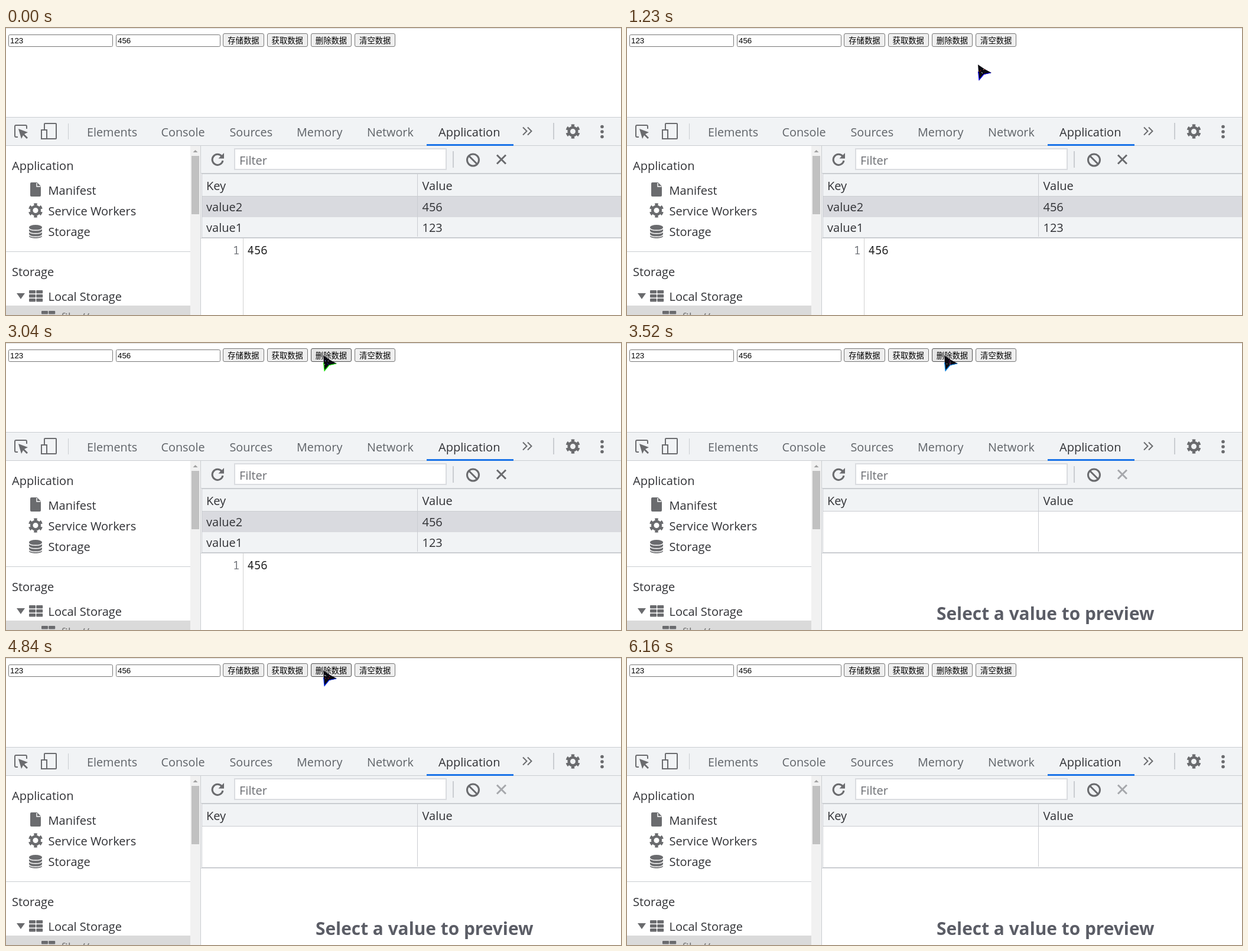
These frames come from a looping animation (1041 by 487 pixels, 6.49 s). An HTML page:

```html
<!DOCTYPE html>
<html lang="zh">
<head>
<meta charset="utf-8">
<title>Local Storage</title>
<style>
html, body { margin: 0; width: 100%; height: 100%; overflow: hidden; background: #fff; }
svg { display: block; width: 1041px; height: 487px; }
text { font: 20px "Open Sans", "Noto Sans", sans-serif; fill: #303135; white-space: pre; }
.tabs text { font-size: 19.8px; fill: #5f6368; }
.page text { font: 13.333px "Liberation Sans", Arial, sans-serif; fill: #000; }
.page .btn text { font-family: "Noto Sans CJK SC", "Noto Sans CJK", sans-serif; }
.page rect { fill: #fff; stroke: #767676; }
.page .btn rect { fill: #efefef; }
.page .btn.hover rect { fill: #e5e5e5; stroke: #4f4f4f; }
.page .btn.active rect { fill: #f5f5f5; stroke: #8d8d8d; }
.code text { font: 500 19px "Noto Sans Mono", "DejaVu Sans Mono", monospace; fill: #222; }
.bar { fill: #f1f3f5; }
.rule { fill: #cacdd1; }
.icon { fill: #6a6b6e; }
.line { fill: none; stroke: #6a6b6e; stroke-width: 2; }
.bold { stroke-width: 3; }
.gap { fill: none; stroke: #fff; stroke-width: 1.4; }
</style>
</head>
<body>
<svg viewBox="0 0 1041 487" xmlns="http://www.w3.org/2000/svg">
  <rect width="1041" height="487" fill="#fff"/>
  <rect width="1041" height="1" fill="#dadada"/>

  <g class="page" id="page">
    <rect x="4.5" y="11.5" width="176" height="20" rx="2"/><text x="7" y="26">123</text>
    <rect x="186.5" y="11.5" width="176" height="20" rx="2"/><text x="189" y="26">456</text>
  </g>

  <!-- tab strip -->
  <rect class="bar" y="152" width="1041" height="48"/>
  <path class="rule" d="M0 151h1041v1H0zM0 199h1041v1H0zM105 162h1v27h-1zM926 161h2v28h-2z"/>
  <g class="tabs">
    <text x="137" y="184">Elements</text>
    <text x="262.5" y="184">Console</text>
    <text x="378.500" y="184">Sources</text>
    <text x="492" y="184">Memory</text>
    <text x="611" y="184">Network</text>
    <text x="732" y="184" style="fill:#303135;font-size:20px">Application</text>
  </g>
  <rect x="712" y="197" width="147" height="3" fill="#1a73e8"/>
  <path class="line" d="M20 185h-3q-2 0-2-2v-16q0-2 2-2h16q2 0 2 2v4"/>
  <path class="icon" d="M21 171l16 6-6 3 6 6-2 2-6-6-3 6z"/>
  <path class="line" d="M65 172v-9q0-1 1-1h18q1 0 1 1v24q0 1-1 1H70M60 173h9v15h-9z"/>
  <path class="line" d="M875 168.500l6.500 6.500-6.500 6.500M883 168.500l6.500 6.500-6.500 6.500"/>
  <g class="icon"><circle cx="1009" cy="167.500" r="2.800"/><circle cx="1009" cy="176" r="2.800"/><circle cx="1009" cy="184.500" r="2.800"/></g>

  <!-- sidebar -->
  <rect x="312" y="200" width="17" height="287" fill="#f1f1f1"/>
  <rect x="314" y="217" width="13" height="99" fill="#c1c1c1"/>
  <path d="M316.500 211h8l-4-4z" fill="#a0a0a0"/>
  <rect y="471" width="312" height="16" fill="#dadada"/>
  <path class="rule" d="M329 200h1v287h-1zM0 379h312v1H0z"/>
  <text x="10" y="241">Application</text>
  <text x="71.500" y="283">Manifest</text>
  <text x="71.500" y="318">Service Workers</text>
  <text x="71.500" y="353">Storage</text>
  <text x="10" y="421">Storage</text>
  <text x="71.500" y="463">Local Storage</text>
  <text x="93" y="498" style="fill:#777">file://</text>
  <path class="icon" d="M43 262h9.500l6.500 6.500V284q0 2-2 2H43q-2 0-2-2v-20q0-2 2-2z"/>
  <path class="gap" d="M52 263v6h6.500"/>
  <path class="icon" d="M39 338v15c0 5 22 5 22 0v-15z"/>
  <ellipse class="icon" cx="50" cy="338" rx="11" ry="4"/>
  <path class="gap" d="M39 339.500c0 5 22 5 22 0M39 345c0 5 22 5 22 0M39 350.500c0 5 22 5 22 0"/>
  <path class="icon" d="M18 450h14l-7 10z"/>
  <g id="grids" class="icon"></g>

  <!-- storage panel -->
  <rect class="bar" x="330" y="200" width="711" height="46"/>
  <rect class="bar" x="332" y="248" width="709" height="37"/>
  <rect x="387" y="205" width="358" height="35" fill="#fff" stroke="#dadce0" stroke-width="2"/>
  <text x="395" y="232" style="fill:#6b6d72">Filter</text>
  <path class="line bold" d="M365 217.500a9 9 0 1 0 2 7.500"/>
  <path class="icon" d="M369 212v9.500h-9.500z"/>
  <circle class="line bold" cx="790.500" cy="224" r="10"/>
  <path class="line bold" d="M783.500 217l14 14"/>
  <path id="cross" class="line bold" d="M831 215.500l15 15M846 215.500l-15 15"/>
  <text x="339" y="275">Key</text><text x="704.500" y="275">Value</text>

  <g id="full">
    <rect x="332" y="286" width="709" height="35" fill="#d9dadf"/>
    <rect class="bar" x="332" y="321" width="709" height="34"/>
    <text x="339" y="311">value2</text><text x="704.500" y="311">456</text>
    <text x="339" y="346">value1</text><text x="704.500" y="346">123</text>
    <g class="code"><text x="384" y="384" style="fill:#74777d">1</text><text x="408.500" y="384">456</text></g>
    <rect x="401" y="357" width="1" height="130" fill="#d0d0d0"/>
  </g>
  <text id="empty" x="524" y="470" style="font-size:29.85px;font-weight:700;fill:#5b5d66">Select a value to preview</text>
  <path class="rule" d="M330 246h711v2H332v107h709v2H330v-1h1V247h-1zM332 285h709v1H332zM696 248h1v106h-1zM756 209h2v28h-2z"/>

  <g id="cursor">
    <path d="M1 1L12 8.500 24 15 11 18 3 28z" fill="#0a0a12"/>
    <path id="edge" d="M23 15L11 17.500 3 27 1.500 13" fill="none" stroke-width="1.200"/>
    <g id="specks"></g>
  </g>
</svg>
<script>
const LOOP = 6490, STEP = 70, CLICK = 3310, CLEARED = 3450, HIDE = 5820;
const $ = id => document.getElementById(id);

function add(parent, tag, attrs) {
  const el = document.createElementNS('http://www.w3.org/2000/svg', tag);
  for (const k in attrs) el.setAttribute(k, attrs[k]);
  return parent.appendChild(el);
}

function gear(cx, cy) {
  const g = add($('grids').parentNode, 'g', { class: 'line' });
  $('cursor').before(g);
  add(g, 'circle', { cx, cy, r: 6.8, style: 'stroke-width:4.6' });
  add(g, 'circle', { cx, cy, r: 10.2, pathLength: 12, 'stroke-dasharray': '1 1', 'stroke-dashoffset': -0.5, style: 'stroke-width:4' });
}
gear(959.5, 175.5);
gear(50, 309.5);

for (const [x, y] of [[39, 445], [60, 480]])
  for (let i = 0; i < 6; i++)
    add($('grids'), 'rect', { x: x + i % 2 * 12.2, y: y + (i >> 1) * 7, width: 11, height: 5.6, rx: 1 });

const buttons = ['存储数据', '获取数据', '删除数据', '清空数据'].map((label, i) => {
  const x = 367.3 + i * 74.27;
  const left = Math.round(x), right = Math.round(x + 69.33);
  const g = add($('page'), 'g', { class: 'btn' });
  add(g, 'rect', { x: left + .5, y: 9.5, width: right - left - 1, height: 22, rx: 2.5 });
  add(g, 'text', { x: x + 8, y: 25.5 }).textContent = label;
  return g;
});
const remove = buttons[2];

// Cursor positions, one per step; the last one is held.
const moves = [
  [530, [[714, 449], [570, 410], [425, 368], [365, 250], [345, 140], [297, 56], [312, 90], [474, 72], [528, 80], [568, 84]]],
  [1230, [[593, 61], [576, 80], [553, 76], [542, 60], [538, 44], [536, 32], [536, 25], [536, 20]]],
  [5400, [[543, 38], [562, 82], [570, 190], [620, 290], [685, 380], [734, 442]]]
];

function cursorAt(t) {
  const move = moves.filter(m => m[0] <= t).pop();
  if (!move || t >= HIDE) return null;
  const [start, points] = move;
  return points[Math.min(points.length - 1, Math.floor((t - start) / STEP))];
}

// The cursor outline cycles through these [time, hue] stops.
const hues = [[530, 200], [1230, 245], [1860, 290], [3040, 480], [3520, 570], [4840, 590], [5820, 660]];
function hueAt(t) {
  let i = 1;
  while (i < hues.length - 1 && hues[i][0] < t) i++;
  const [t0, h0] = hues[i - 1], [t1, h1] = hues[i];
  return h0 + (h1 - h0) * (t - t0) / (t1 - t0);
}

const specks = Array.from({ length: 6 }, () => add($('specks'), 'rect', { width: 1, height: 1 }));
const rand = n => { const v = Math.sin(n * 127.1) * 43758.5; return v - Math.floor(v); };

function draw() {
  const t = performance.now() % LOOP;
  const tick = Math.floor(t / STEP);
  const pos = cursorAt(t);
  const cleared = t >= CLEARED;

  $('full').style.display = cleared ? 'none' : '';
  $('empty').style.display = cleared ? '' : 'none';
  $('cross').style.stroke = cleared ? '#a6a8ac' : '';

  const over = pos && pos[0] >= 516 && pos[0] < 585 && pos[1] >= 9 && pos[1] < 32;
  const pressed = over && t >= CLICK && t < CLEARED;
  remove.setAttribute('class', 'btn' + (pressed ? ' active' : over ? ' hover' : ''));

  $('cursor').style.display = pos ? '' : 'none';
  if (pos) {
    const hue = hueAt(tick * STEP);
    $('cursor').setAttribute('transform', `translate(${pos})`);
    $('edge').setAttribute('stroke', `hsl(${hue} 100% 48%)`);
    specks.forEach((s, i) => {
      const n = tick * 13 + i * 2;
      s.setAttribute('x', Math.floor(3 + rand(n) * 9));
      s.setAttribute('y', Math.floor(9 + rand(n + 1) * 8));
      s.setAttribute('fill', i % 2 ? '#ddd' : `hsl(${hue + 120} 90% 50%)`);
    });
  }
  requestAnimationFrame(draw);
}
draw();
</script>
</body>
</html>
```
